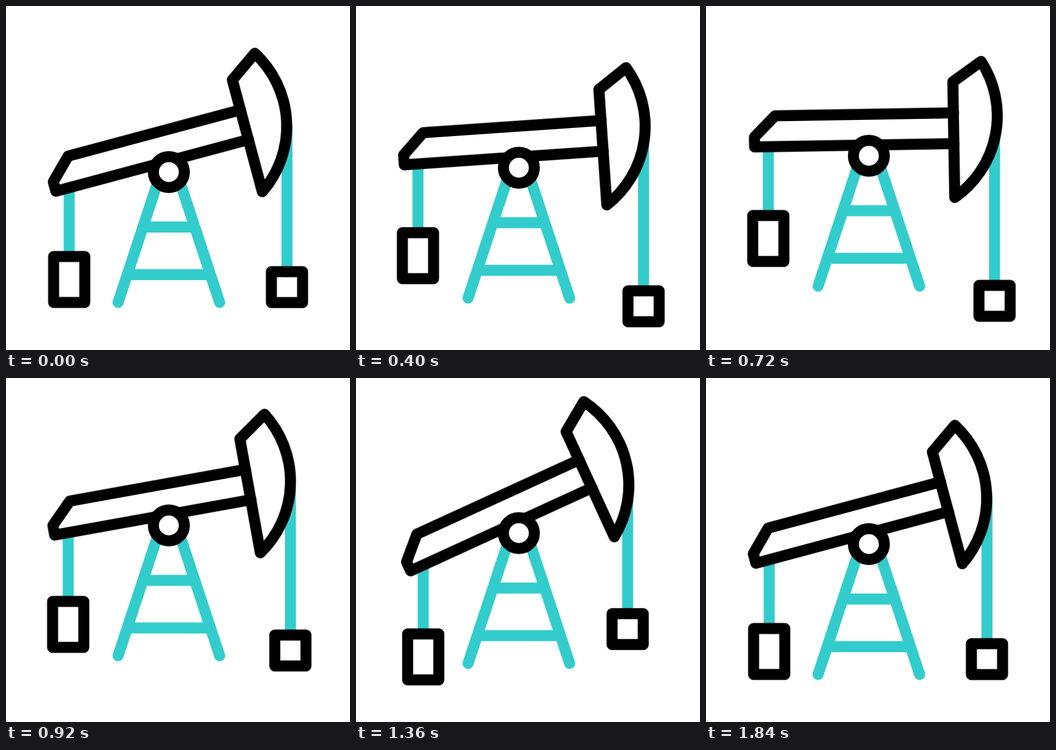
Animation of 640x640 px, one loop 2 s. Source, as an HTML page:

```html
<!DOCTYPE html>
<html lang="en">
<head>
<meta charset="utf-8">
<title>Pump jack</title>
<style>
  html, body { margin: 0; width: 100%; height: 100%; overflow: hidden; background: #fff; }
  svg { display: block; width: 100%; height: 100%; }

  path, line, rect, circle {
    fill: none;
    stroke: #000;
    stroke-width: 20.5;
    stroke-linecap: round;
    stroke-linejoin: round;
  }
  .teal { stroke: #33cccc; }
  .solid { fill: #fff; }

  .rig, .tilt, .hang { animation: 2s infinite; }
  .rig { animation-name: lift; animation-timing-function: ease-in-out; }
  .tilt, .hang { animation-timing-function: cubic-bezier(.333, 0, .667, 1); }
  .tilt { animation-name: tilt; }
  .hang { animation-name: level; }

  @keyframes lift {
    0%, 7.25% { transform: translateY(0); }
    45.5%, 51.25% { transform: translateY(-34.7px); }
    88.75%, 100% { transform: translateY(0); }
  }
  @keyframes tilt {
    0%, 2.5% { transform: rotate(-15deg); }
    28.9%, 32.4% { transform: rotate(0deg); }
    63.55%, 65.1% { transform: rotate(-25deg); }
    89.85%, 100% { transform: rotate(-15deg); }
  }
  /* Cancels the tilt so the weights hang straight down. */
  @keyframes level {
    0%, 2.5% { transform: rotate(15deg); }
    28.9%, 32.4% { transform: rotate(0deg); }
    63.55%, 65.1% { transform: rotate(25deg); }
    89.85%, 100% { transform: rotate(15deg); }
  }
</style>
</head>
<body>
<svg viewBox="0 0 640 640">
  <g class="rig">
    <!-- Origin is the pivot of the beam. -->
    <g transform="translate(303 309)">
      <path class="teal" d="M-21.8 22L-94.5 242.5M21.8 22L94.5 242.5M-48 102.3H48M-77 190.8H77"/>

      <g class="tilt">
        <g transform="translate(-186.8 -19.5)">
          <g class="hang">
            <line class="teal" y2="127.6"/>
            <rect x="-29" y="127.6" width="58" height="85.5"/>
          </g>
        </g>
        <g transform="translate(234.3 -25.5)">
          <g class="hang">
            <line class="teal" y2="270.4"/>
            <rect x="-29" y="270.4" width="58" height="57.5"/>
          </g>
        </g>

        <path class="solid" d="M158.5 -135L211.7 -172.1A185.4 185.4 0 0 1 158.5 80.2Z"/>
        <path d="M159 -77.3H-173.3L-212.3 -38.3V-19.9H159"/>
      </g>

      <circle class="solid" r="28.8"/>
    </g>
  </g>
</svg>
</body>
</html>
```
